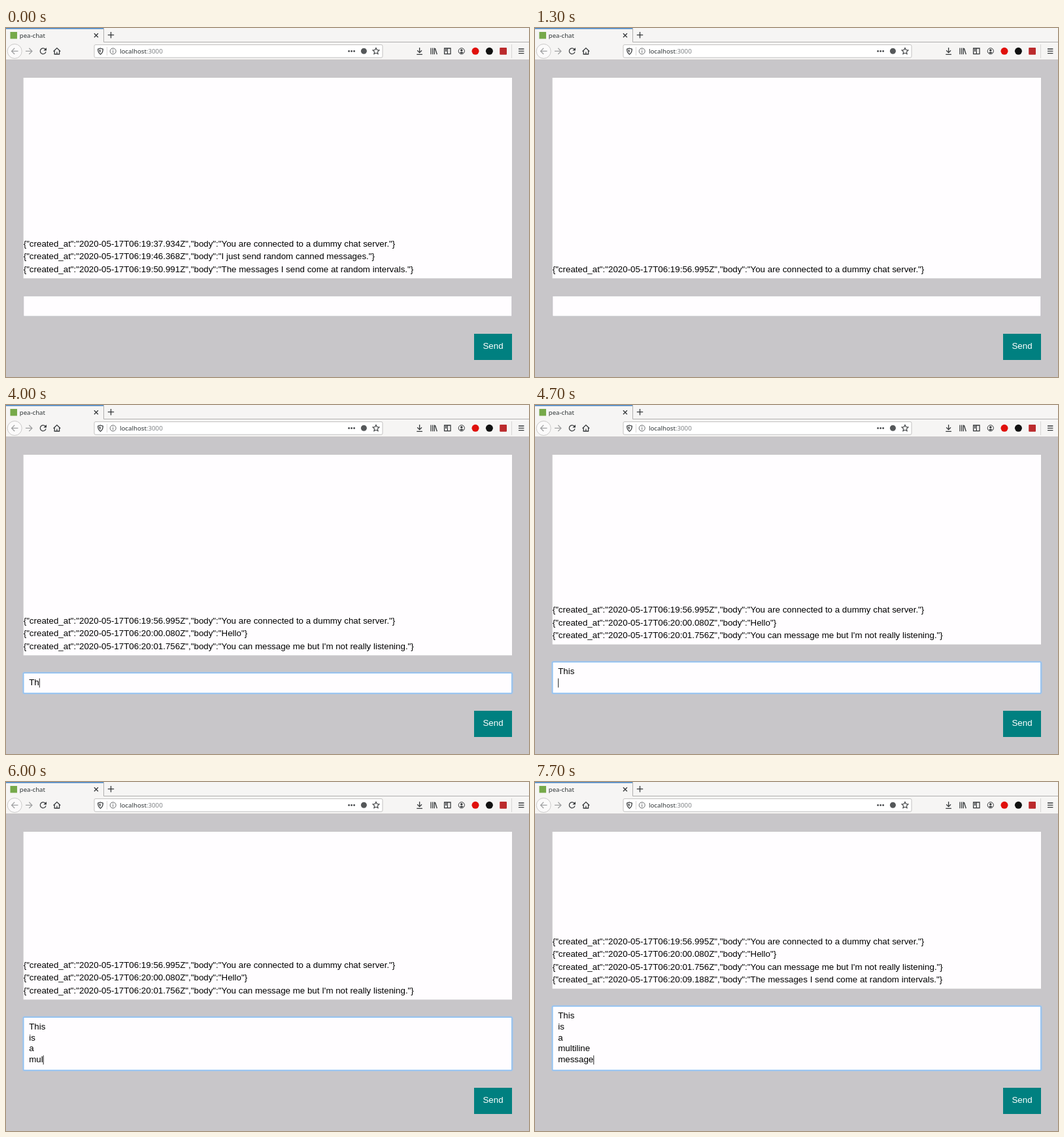
An HTML page for the animation above (8 s loop, 800 by 533 pixels).

```html
<!DOCTYPE html>
<html lang="en">
<head>
<meta charset="utf-8">
<title>Chat demo</title>
<style>
  html, body { margin: 0; width: 100%; height: 100%; overflow: hidden; background: #fffdff; }
  svg { display: block; width: 100%; height: 100%; }
  text { white-space: pre; }
  .ui { font-family: "Noto Sans", "Open Sans", sans-serif; fill: #2e3436; }
  .page text { font: 13.333px "Liberation Sans", Arial, sans-serif; }
  .icon { fill: none; stroke: #36393b; stroke-width: 1.3; }
</style>
</head>
<body>
<svg viewBox="0 0 800 533">
  <rect width="800" height="533" fill="#fffdff"/>

  <g class="page" id="page">
    <rect y="48" width="800" height="485" fill="#c8c6c9"/>
    <rect id="panel" x="26.7" y="76" width="747.3" fill="#fffdff"/>
    <g id="chat"></g>
    <g id="field">
      <rect class="box glow" x="26.4" width="748" rx="2" fill="none" stroke="#9fcaf5" stroke-opacity=".5" stroke-width="3.4"/>
      <rect class="box edge" x="26.8" width="747" rx="1" fill="#fffdff"/>
    </g>
    <g id="draft"></g>
    <rect id="caret" y="417.5" width="1" height="14" fill="#222"/>
    <rect x="716" y="467" width="58" height="40" fill="#008080"/>
    <text x="745" y="490.4" text-anchor="middle" fill="#fff">Send</text>
  </g>

  <g id="status">
    <path d="M0 517.8H213a2 2 0 0 1 2 2V534H-1V517.8Z" fill="#f5f4f3" stroke="#c3c2c1" stroke-width=".9"/>
    <text class="ui" x="2.5" y="529.5" font-size="9.3">Read localhost</text>
  </g>

  <!-- browser frame -->
  <rect width="800" height="48.5" fill="#f6f5f4"/>
  <path d="M149.5 0V21.5H800" fill="none" stroke="#a9a8a7" stroke-width=".9"/>
  <path d="M0 48.5H800" stroke="#c9c7c6" stroke-width=".9"/>
  <rect width="149" height="1.6" fill="#4a86c5"/>
  <rect id="favicon" x="6.5" y="6" width="10.5" height="10.5" fill="#76a94a"/>
  <rect id="throbber" y="10.5" width="5" height="2" rx="1" fill="#66696b"/>
  <text class="ui" id="title" x="20.8" y="14.8" font-size="9.6"></text>
  <path class="icon" d="M134.9 8.2l6 6m0-6l-6 6M160.5 6v9.4M155.8 10.7h9.4"/>

  <circle cx="13.2" cy="35.5" r="11" fill="#fbfafa" stroke="#c4c3c2" stroke-width=".9"/>
  <path class="icon" style="stroke:#a0a1a2" d="M18.5 35.4H8.6m4.6-4.6l-4.6 4.6 4.6 4.6M30 35.4h9.9m-4.6-4.6l4.6 4.6-4.6 4.6"/>
  <path id="ring" class="icon" pathLength="100" d="M60 32.3A4.4 4.4 0 1 0 61 36.4"/>
  <path id="ringTip" fill="#36393b" d="M62 30v4.6h-4.6Z"/>
  <path id="stop" class="icon" d="M53 31.6l7.4 7.4m0-7.4l-7.4 7.4"/>
  <path class="icon" d="M72.6 35.8l5.3-5.2 5.3 5.2M74.2 35v5h7.4v-5M77.9 40v-3.4"/>

  <rect x="135" y="25.6" width="441" height="19.6" rx="2" fill="#fff" stroke="#bdbbba" stroke-width=".9"/>
  <path d="M154.5 29v13M773.5 25v21" stroke="#d5d3d2" stroke-width=".9"/>
  <path class="icon" stroke-width="1.1" d="M144.5 31l3.8 1.2c0 4-1 6.4-3.8 7.9-2.8-1.5-3.8-3.9-3.8-7.9Z"/>
  <path fill="#36393b" d="M144.5 33v5c-1.3-1-1.9-2.3-2-4.4Z"/>
  <g class="icon" style="stroke:#66696b;stroke-width:1">
    <circle cx="163.7" cy="35.4" r="4.5"/>
    <path d="M163.7 34.6v3.3M163.7 32.5v1.2"/>
  </g>
  <text class="ui" x="174" y="39" font-size="9.7">localhost<tspan fill="#7d8083">:3000</tspan></text>
  <g fill="#44474a">
    <circle cx="524.6" cy="35.4" r="1.4"/><circle cx="528.6" cy="35.4" r="1.4"/><circle cx="532.6" cy="35.4" r="1.4"/>
    <circle cx="547.4" cy="35.3" r="4.5" fill="#55585a"/>
  </g>
  <path id="star" class="icon" style="stroke-width:1.1"/>

  <g class="icon">
    <path d="M632.6 30v7.4m-3.4-3.2l3.4 3.4 3.4-3.4M628.3 40.3h8.6"/>
    <path d="M650 30.6v9.6M652.7 30.6v9.6M655.3 30.6v9.6M656.3 31l3 9.2"/>
    <path d="M670.6 31h9.4v8.6h-9.4ZM675.3 31v8.6M672 33h2M672 35h2"/>
    <circle cx="696.8" cy="35.3" r="4.6" stroke-width="1"/>
    <path d="M784 32h8.4M784 35.3h8.4M784 38.6h8.4"/>
  </g>
  <path fill="#36393b" d="M696.8 32.2a1.7 1.7 0 0 1 0 3.5 1.7 1.7 0 0 1 0-3.5M693.8 37.8q3-2.6 6 0-3 2.2-6 0"/>
  <circle cx="718" cy="35.3" r="5.5" fill="#e0100c"/>
  <circle cx="739.4" cy="35.3" r="5.5" fill="#111"/>
  <rect x="755.2" y="30" width="10.8" height="10.8" rx="1" fill="#bb2a2c"/>
</svg>

<script>
const LOOP = 8000, STEP = 100;
const LINE = 16.667, CHAT_LINE = 19.33, DRAFT_X = 35.2;
const BLANK = 300, RENDERED = 900, FOCUSED = 1500;

const $ = id => document.getElementById(id);
const show = (id, on) => $(id).style.display = on ? '' : 'none';

const message = (time, body) => `{"created_at":"2020-05-17T06:${time}Z","body":"${body}"}`;
const greeting = 'You are connected to a dummy chat server.';
const intervals = 'The messages I send come at random intervals.';
const history = [
  message('19:37.934', greeting),
  message('19:46.368', 'I just send random canned messages.'),
  message('19:50.991', intervals)
];
const incoming = [
  [1300, message('19:56.995', greeting)],
  [2500, message('20:00.080', 'Hello')],
  [3200, message('20:01.756', "You can message me but I'm not really listening.")],
  [6200, message('20:09.188', intervals)]
];

// Bursts of typing, one character per step; an empty burst sends the draft.
const bursts = [
  [1900, 'Hello'], [2400, ''], [3800, 'T'], [4000, 'his'], [4500, '\n'],
  [4900, 'is'], [5200, '\n'], [5400, 'a'], [5500, '\n'], [5700, 'mu'],
  [6000, 'ltiline'], [6900, '\n'], [7100, 'message']
];

function typed(t) {
  let text = '', last = FOCUSED;
  for (const [start, chars] of bursts) {
    if (t < start) break;
    const count = Math.min(chars.length, (t - start) / STEP + 1);
    text = chars ? text + chars.slice(0, count) : '';
    last = start + Math.max(0, count - 1) * STEP;
  }
  return { lines: text.split('\n'), last };
}

function makeLines(id, x, count) {
  return Array.from({ length: count }, () => {
    const line = document.createElementNS('http://www.w3.org/2000/svg', 'text');
    line.setAttribute('x', x);
    return $(id).appendChild(line);
  });
}
const chatLines = makeLines('chat', 26.7, 4);
const draftLines = makeLines('draft', DRAFT_X, 5);

// Place lines so that the last one sits on the given baseline.
function setLines(nodes, lines, baseline, pitch) {
  nodes.forEach((node, i) => {
    node.textContent = lines[i] || '';
    node.setAttribute('y', baseline - (lines.length - 1 - i) * pitch);
  });
}

function drawPage(t) {
  const { lines, last } = typed(t);
  const grown = (lines.length - 1) * LINE;
  const focused = t >= FOCUSED;
  const messages = t < BLANK ? history : incoming.filter(m => t >= m[0]).map(m => m[1]);

  $('panel').setAttribute('height', 306.3 - grown);
  setLines(chatLines, messages, 372.7 - grown, CHAT_LINE);
  setLines(draftLines, lines, 427.9, LINE);

  for (const box of document.querySelectorAll('.box')) {
    box.setAttribute('y', 409.2 - grown);
    box.setAttribute('height', 31 + grown);
  }
  const edge = document.querySelector('.edge');
  edge.setAttribute('stroke', focused ? '#8cbff2' : '#bdbbc0');
  edge.setAttribute('stroke-width', focused ? 1.4 : 0.8);
  document.querySelector('.glow').style.display = focused ? '' : 'none';

  show('caret', focused && (t - last) % 700 < 400);
  $('caret').setAttribute('x', DRAFT_X + draftLines[lines.length - 1].getComputedTextLength());
}

function drawFrame(t) {
  const loading = t >= 100 && t < 1000;
  const stopping = t >= 200 && t < 700;
  const ringGrowing = t >= 700 && t < 1100;

  show('favicon', !loading);
  show('throbber', loading);
  $('throbber').setAttribute('x', 10 + 4 * Math.sin((t - 700) / 134));
  $('title').textContent = t >= BLANK && t < RENDERED ? 'Pea App' : 'pea-chat';

  show('stop', stopping);
  show('ring', !stopping);
  show('ringTip', !stopping && !ringGrowing);
  $('ring').style.strokeDasharray = ringGrowing ? `0 15 ${12 + (t - 700) / 5} 100` : 'none';
  $('ring').style.stroke = ringGrowing ? '#909294' : '';
  show('status', t >= 500 && t < RENDERED);
}

function render(t) {
  show('page', t < BLANK || t >= RENDERED);
  drawPage(t);
  drawFrame(t);
}

const starPoints = Array.from({ length: 10 }, (_, i) => {
  const r = i % 2 ? 2.5 : 5.2, a = i * Math.PI / 5;
  return `${566 + r * Math.sin(a)} ${35.6 - r * Math.cos(a)}`;
});
$('star').setAttribute('d', `M${starPoints.join('L')}Z`);

const begin = performance.now();
let shown = -1;
function tick() {
  const t = Math.floor((performance.now() - begin) % LOOP / STEP) * STEP;
  if (t !== shown) render(shown = t);
  requestAnimationFrame(tick);
}
tick();
</script>
</body>
</html>
```
